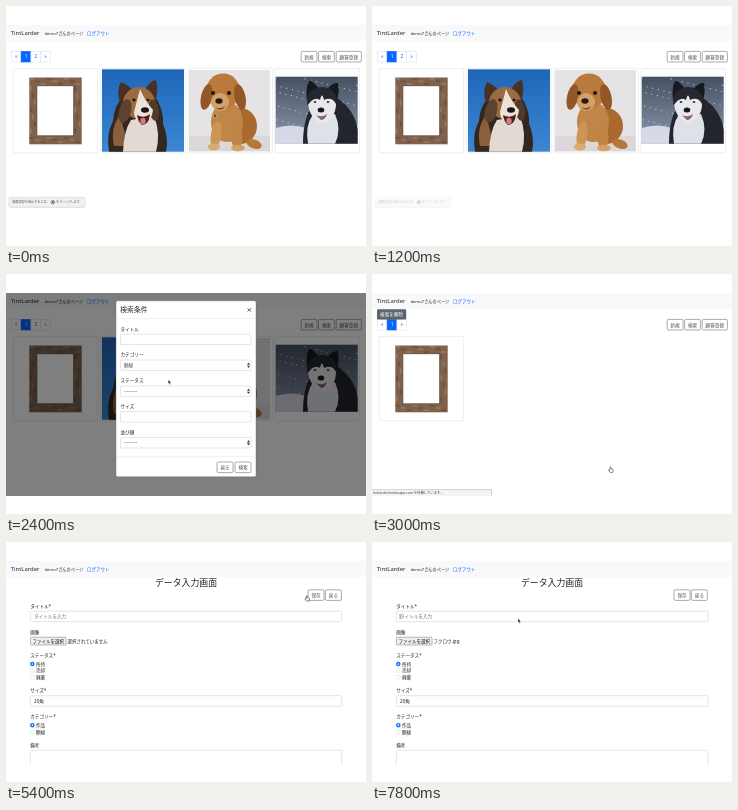
An HTML page for the animation above (8 s loop, 360x240 px).

```html
<!DOCTYPE html>
<html lang="ja">
<head>
<meta charset="utf-8">
<style>
html, body { margin: 0; width: 100%; height: 100%; overflow: hidden; background: #fff; }
svg { display: block; width: 100vw; height: 100vh; }
text { font-family: "Noto Sans", "Noto Sans CJK JP", "Noto Sans CJK", sans-serif; white-space: pre; }
</style>
</head>
<body>
<svg id="stage" viewBox="0 0 360 240" xmlns="http://www.w3.org/2000/svg"></svg>
<script>
const INK = '#212529', BLUE = '#0766fb', GRAY = '#5c636a', LINE = '#dee2e6';
const LOOP = 8000, STEP = 600;

const rect = (x, y, w, h, fill, extra = '') =>
  `<rect x="${x}" y="${y}" width="${w}" height="${h}" fill="${fill}" ${extra}/>`;
const oval = (x, y, rx, ry, fill, turn = 0) =>
  `<ellipse cx="${x}" cy="${y}" rx="${rx}" ry="${ry}" fill="${fill}" transform="rotate(${turn} ${x} ${y})"/>`;
const path = (d, fill) => `<path d="${d}" fill="${fill}"/>`;
const text = (x, y, size, str, fill = INK, extra = '') =>
  `<text x="${x}" y="${y}" font-size="${size}" fill="${fill}" ${extra}>${str}</text>`;
const mid = (x, y, size, str, fill, extra = '') =>
  text(x, y, size, str, fill, 'text-anchor="middle" ' + extra);
const group = (id, body, extra = '') => `<g id="${id}" ${extra}>${body}</g>`;
const box = (x, y, w, h, stroke = '#ced4da', r = 1) =>
  rect(x, y, w, h, '#fff', `rx="${r}" stroke="${stroke}" stroke-width=".6"`);
const button = (x, y, w, str) =>
  box(x, y, w, 10.6, '#6c757d', 1.3) + mid(x + w / 2, y + 7.1, 4.6, str, '#495057');
const label = (x, y, str) => text(x, y, 4.6, str, INK, 'font-weight="500"');

function pager(items) {
  return items.map((s, i) => {
    const x = 5.3 + i * 9.8, on = s === '1';
    return rect(x, 45.4, 9.8, 10.6, on ? BLUE : '#fff', `stroke="${on ? BLUE : LINE}" stroke-width=".6"`) +
      mid(x + 4.9, 52.4, 4.8, s, on ? '#fff' : BLUE);
  }).join('');
}

const card = x => box(x, 62.4, 84.4, 84.4, LINE);

function frameArt() {
  let s = rect(23.3, 71.5, 52.4, 66.8, '#80624c');
  for (let i = 0; i < 9; i++) {
    s += rect(23.3 + i * 5.8, 72 + i % 3 * 2.6, 4.6, 1.6, i % 2 ? '#6a4e3b' : '#9a7b63') +
      rect(23.3 + i * 5.8, 131 + i % 3 * 2.2, 4.4, 1.6, i % 2 ? '#987860' : '#6b4f3c');
  }
  for (let i = 0; i < 7; i++) {
    s += rect(24 + i % 3 * 2, 80 + i * 7.1, 1.6, 5, i % 2 ? '#6b4f3c' : '#97775f') +
      rect(68.4 + i % 3 * 2.2, 80 + i * 7.1, 1.6, 5, i % 2 ? '#98785f' : '#6a4e3b');
  }
  return s + rect(30.9, 79.8, 36.8, 50, '#fff', 'stroke="#57402f" stroke-width=".7"');
}

function collie() {
  return rect(96, 63.3, 82, 82.4, 'url(#sky)') +
    path('M103 145.7 Q100 128 107 115 Q108 99 118 90 L148 89 Q158 103 157 118 Q163 132 160 145.7Z', '#33271f') +
    path('M108 140 Q104 122 114 109 Q118 124 122 140Z', '#8a5f3e') +
    path('M117 145.7 Q118 124 125 114 L148 110 Q155 128 150 145.7Z', '#e2dad2') +
    path('M114 98 Q110 84 115 76 Q123 79 128 86Z', '#4a3123') +
    path('M139 84 Q143 75 150 74 Q153 84 149 96Z', '#4a3123') +
    oval(133, 97, 16, 16, '#9b6b43') +
    oval(119, 105, 6, 12, '#5d4230', 14) +
    oval(148, 104, 5, 11, '#523a2b', -10) +
    path('M134 83 Q139 95 147 104 Q146 116 136 117 Q128 114 128 106Z', '#ece2d5') +
    oval(139, 104, 4, 2.8, '#17151a') +
    path('M131 109 Q138 113 144 108 Q143 119 136 119 Q132 116 131 109Z', '#4a2022') +
    oval(137, 115, 2.7, 3.2, '#d77b80') +
    oval(128, 94, 1.7, 1.4, '#1c1412') + oval(142, 94, 1.5, 1.3, '#1c1412');
}

function puppy() {
  return rect(183, 64, 81, 81.3, '#e6e3e5') + rect(183, 130, 81, 15.3, '#dcd8d9') +
    oval(234, 120, 17, 18, '#a9692f') +
    oval(221, 116, 16, 20, '#c08648') +
    oval(210, 129, 5.2, 14, '#cd9656', 8) + oval(231, 131, 5.5, 13, '#bf8443') +
    oval(208, 141, 6, 3.4, '#d9ab72') + oval(232, 142, 7, 3.3, '#d3a266') +
    oval(248, 138, 8, 4.5, '#b5773a', 20) +
    oval(217, 85, 17, 17.5, '#b97a3c') +
    oval(200.5, 91, 5.5, 13, '#935727', 12) + oval(234, 91, 5.5, 13, '#935727', -12) +
    oval(214, 96, 9, 9, '#d3a268') +
    oval(213, 95, 3.6, 2.8, '#251a18') +
    oval(207, 87, 2.1, 2.1, '#241814') + oval(223, 87, 2.1, 2.1, '#241814') +
    path('M209 101 Q214 104 219 100 L218 102 Q214 106 209 101Z', '#74462c');
}

function husky() {
  let snow = '';
  for (let i = 0; i < 60; i++) {
    snow += oval(270 + (i * 37.7) % 81, 72 + (i * 23.3) % 48, .7, .6, '#c0c8d5');
  }
  return rect(269.7, 70.7, 82, 67, 'url(#wood)') + snow +
    path('M269.7 122 Q285 117 300 122 L351.7 119 V137.7 H269.7Z', '#d5dae6') +
    path('M297 137.7 Q297 113 306 100 L331 92 Q349 104 351.7 124 V137.7Z', '#22252d') +
    path('M302 137.7 Q299 120 306 110 L329 108 Q336 124 329 137.7Z', '#dfe1e8') +
    path('M301 95 Q299 80 304 74 Q311 79 315 86Z', '#17191f') +
    path('M320 85 Q326 76 332 77 Q334 87 330 97Z', '#17191f') +
    oval(316, 95, 15, 14, '#252832') +
    path('M302 99 Q308 90 314 94 Q316 85 318 94 Q326 90 330 98 Q330 112 316 118 Q304 113 302 99Z', '#e8e7eb') +
    oval(315, 104, 3.3, 2.5, '#15161b') +
    oval(309, 96, 1.3, 1.1, '#30343e') + oval(322, 96, 1.3, 1.1, '#30343e') +
    path('M310 109 Q316 112 321 108 Q319 114 315 114Z', '#8e6267');
}

function select(y, value, id = '') {
  return box(114.5, y, 130.6, 10.4) + text(118, y + 6.8, 4.6, value, '#495057', id) +
    path(`M241 ${y + 4.8}l1.5 -2.3l1.5 2.3zM241 ${y + 5.7}l1.5 2.3l1.5 -2.3z`, '#343a40');
}

function modal() {
  return rect(0, 19, 360, 203, '#000', 'opacity=".5"') +
    rect(110, 26.8, 140, 176, '#fff', 'rx="1.6" stroke="#666" stroke-width=".4"') +
    text(114.3, 38.4, 6.8, '検索条件', INK, 'font-weight="500"') +
    '<path d="M241.6 34.2l3.4 3.4m0 -3.4l-3.4 3.4" stroke="#444" stroke-width=".9"/>' +
    rect(110, 44.4, 140, .5, LINE) + rect(110, 182.6, 140, .5, LINE) +
    label(114.5, 56.8, 'タイトル') + box(114.5, 60.2, 130.6, 10.4) +
    label(114.5, 82.2, 'カテゴリー') + select(86, '---------', 'id="category"') +
    label(114.5, 108, 'ステータス') + select(112, '---------') +
    label(114.5, 133.8, 'サイズ') + box(114.5, 137.6, 130.6, 10.4) +
    label(114.5, 159.6, '並び順') + select(163.6, '---------') +
    button(211, 188, 16, '戻る') + button(229, 188, 16, '検索');
}

function radio(y, str, on) {
  return `<circle cx="26.3" cy="${y}" r="2" fill="${on ? BLUE : '#fff'}" stroke="${on ? BLUE : '#d3d8dc'}" stroke-width=".5"/>` +
    (on ? `<circle cx="26.3" cy="${y}" r=".85" fill="#fff"/>` : '') +
    text(30, y + 1.7, 4.6, str, INK, 'font-weight="500"');
}

function form() {
  return mid(180, 43.6, 8.9, 'データ入力画面', INK, 'font-weight="500"') +
    button(302, 47.8, 16, '保存') + button(319.4, 47.8, 16, '戻る') +
    label(24.2, 65.6, 'タイトル*') + box(24.4, 69.2, 311.4, 10.5) +
    text(28, 76.2, 4.6, 'タイトルを入力', '#6c757d') +
    group('caret', rect(27.8, 71.8, .5, 5.4, '#222')) +
    label(24.2, 91.6, '画像') +
    rect(24.5, 95.2, 35.6, 7.8, '#efefef', 'rx=".8" stroke="#767676" stroke-width=".5"') +
    mid(42.3, 100.8, 4.5, 'ファイルを選択', '#111', 'font-weight="500"') +
    text(61.5, 100.8, 4.5, '', INK, 'id="file" font-weight="500"') +
    label(24.2, 114.6, 'ステータス*') +
    radio(122, '所持', true) + radio(128.6, '売却') + radio(135.2, '廃棄') +
    label(24.2, 150, 'サイズ*') + box(24.4, 153.7, 311.4, 10.5) + text(28, 160.7, 4.6, '20角') +
    label(24.2, 175.9, 'カテゴリー*') + radio(183.2, '作品', true) + radio(189.8, '額縁') +
    label(24.2, 204.5, '備考') + box(24.4, 208.2, 311.4, 26);
}

const toast =
  rect(2.8, 191.6, 76.5, 10.2, '#777', 'rx="2" opacity=".22"') +
  rect(3, 191.2, 76, 9.8, '#f1f1f1', 'rx="1.8" stroke="#d0d0d0" stroke-width=".4"') +
  text(6.2, 197.4, 3.15, '画面収録を停止するには、', '#555') +
  '<circle cx="46.8" cy="196.2" r="1.8" fill="#fff" stroke="#444" stroke-width=".6"/>' +
  rect(46, 195.4, 1.6, 1.6, '#444') +
  text(50.2, 197.4, 2.95, 'をクリックします', '#555');

const status =
  rect(-1, 215.6, 120.6, 8, '#f4f4f4', 'rx="1" stroke="#b8b8b8" stroke-width=".6"') +
  text(1, 220.3, 3.35, 'tintlarder.herokuapp.com を待機しています...', '#444');

const stage = document.getElementById('stage');
stage.innerHTML =
  `<defs>
    <linearGradient id="sky" x2="0" y2="1"><stop stop-color="#1f66b8"/><stop offset="1" stop-color="#3c86d2"/></linearGradient>
    <linearGradient id="wood" x2="0" y2="1"><stop stop-color="#465062"/><stop offset="1" stop-color="#8c98ad"/></linearGradient>
    <clipPath id="page"><rect y="19" width="360" height="203"/></clipPath>
  </defs>` +
  rect(0, 0, 360, 240, '#fff') +
  group('view',
    rect(0, 19, 360, 16, '#f8f9fa') +
    text(4.8, 29.2, 5.9, 'TintLarder') +
    text(38.4, 28.9, 4.2, 'demo7さんのページ') +
    text(81, 28.9, 4.5, 'ログアウト', BLUE) +
    group('list',
      button(295.2, 45.4, 15.8, '新規') + button(312.6, 45.4, 15.8, '検索') + button(330.2, 45.4, 25.2, '顧客登録') +
      card(7.3) + frameArt()) +
    group('all', pager(['«', '1', '2', '»']) +
      card(94.8) + collie() + card(182) + puppy() + card(269) + husky()) +
    group('found', pager(['«', '1', '»']) +
      rect(5, 35.2, 29.2, 10.2, GRAY, 'rx="1.2"') + mid(19.6, 42, 4.6, '検索を解除', '#fff')) +
    group('form', form()) +
    group('modal', modal()) +
    group('toast', toast) + group('status', status), 'clip-path="url(#page)"') +
  group('arrow', '<path d="M0 0v4l.9 -.8l.7 1.6l.8 -.4l-.7 -1.5h1.2z" fill="#111" stroke="#fff" stroke-width=".35"/>') +
  group('hand', '<path d="M-.7 0q.6 -.8 1.1 0v1.5l1.9 .6q.5 .4 .2 1.8l-.5 1.2h-2.4l-1.7 -2.2q.2 -.8 1.4 0z" fill="#fff" stroke="#222" stroke-width=".55"/>');

const scenes = [
  { page: 'all', toast: 1, arrow: [208, 107.5] },
  { page: 'all', toast: .7, arrow: [208, 107.5] },
  { page: 'all', toast: .3 },
  { page: 'all', modal: 1, arrow: [162.3, 105.8] },
  { page: 'all', modal: 1, category: '額縁', arrow: [162.3, 105.8] },
  { page: 'found', status: 1, hand: [238.6, 193.3] },
  { page: 'found', status: .35, arrow: [130, 120] },
  { page: 'found', hand: [23.6, 43] },
  { page: 'all', hand: [301, 54] },
  { page: 'form', hand: [301, 54] },
  { page: 'form', arrow: [42, 99] },
  { page: 'form', arrow: [42, 99] },
  { page: 'form', file: 'フクロウ.jpg', arrow: [146, 76.5] },
  { page: 'form', file: 'フクロウ.jpg', caret: 1, arrow: [146, 76.5] }
];

const el = id => document.getElementById(id);
const fade = (id, alpha) => el(id).setAttribute('opacity', Number(alpha || 0));
const place = (id, at) => {
  fade(id, at ? 1 : 0);
  if (at) el(id).setAttribute('transform', `translate(${at})`);
};

function draw(t) {
  const s = scenes[Math.floor((t % LOOP) / STEP)];
  for (const id of ['all', 'found', 'form']) fade(id, s.page === id);
  fade('list', s.page !== 'form');
  for (const id of ['modal', 'toast', 'status', 'caret']) fade(id, s[id]);
  place('arrow', s.arrow);
  place('hand', s.hand);
  el('category').textContent = s.category || '---------';
  el('file').textContent = s.file || '選択されていません';
}

const start = performance.now();
function tick() {
  draw(Math.max(0, performance.now() - start));
  requestAnimationFrame(tick);
}
tick();
</script>
</body>
</html>
```
